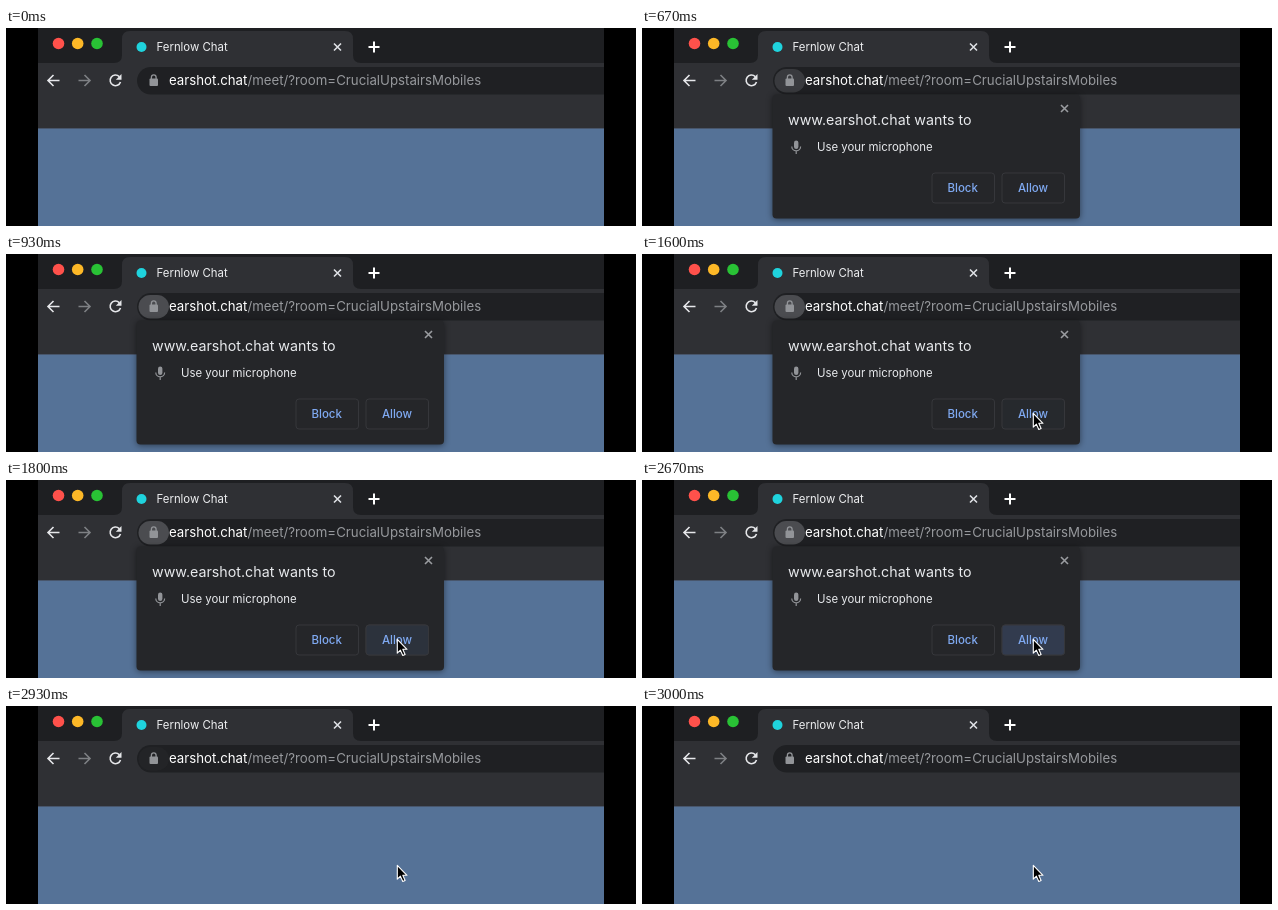
An HTML page that plays this animation: 630 px wide and 198 px high, repeating every 3070 ms.

```html
<!DOCTYPE html>
<html lang="en">
<head>
<meta charset="utf-8">
<title>Microphone permission</title>
<style>
  html, body { margin: 0; width: 100%; height: 100%; overflow: hidden; background: #000; }
  svg { display: block; font: 11.4px Inter, sans-serif; }
  .line { fill: none; stroke-width: 1.6; }
  .button rect { stroke: #36373b; }
  .button text { fill: #7fa9f1; font-size: 11.5px; font-weight: 500; text-anchor: middle; }
  #dialog { filter: drop-shadow(0 1px 3px #0007); }
</style>
</head>
<body>
<svg width="630" height="198" viewBox="0 0 630 198">
  <defs>
    <path id="cross" class="line" d="M-3.5-3.5 3.5 3.5M3.5-3.5-3.5 3.5"/>
    <path id="arrow" class="line" d="M6 0H-5.2M0-5.5-5.5 0 0 5.5"/>
    <clipPath id="window"><path d="M32 0H598V198H32z"/></clipPath>
  </defs>

  <g clip-path="url(#window)">
    <path fill="#1e1f22" d="M32 0H598V36H32z"/>
    <path fill="#2f3034" d="M32 35H108Q116 35 116 27V11Q116 3 124 3H339Q347 3 347 11V27Q347 35 355 35H598V100H32z"/>
    <path fill="#48566c" d="M32 100H598V101H32z"/>
    <path fill="#557297" d="M32 101H598V198H32z"/>

    <circle cx="52.5" cy="15.5" r="5.8" fill="#ff514b"/>
    <circle cx="71.7" cy="15.5" r="5.8" fill="#fdb827"/>
    <circle cx="91" cy="15.5" r="5.8" fill="#29c235"/>

    <circle cx="135.5" cy="19" r="5" fill="#1fd3dd"/>
    <text x="150.5" y="23" fill="#eeeff1">Fernlow Chat</text>
    <use href="#cross" x="331.5" y="19" stroke="#dfe1e5"/>
    <path class="line" stroke="#fff" style="stroke-width:2" d="M368 13.5V24.5M362.5 19H373.5"/>

    <use href="#arrow" x="47.5" y="52.5" stroke="#e6e7ea"/>
    <use href="#arrow" transform="translate(78.5 52.5) scale(-1 1)" stroke="#7e8084"/>
    <path class="line" stroke="#e6e7ea" d="M113.2 48.6A5.3 5.3 0 1 0 114.5 54"/>
    <path fill="#e6e7ea" d="M115.5 46V51.7H109.8z"/>

    <rect x="131" y="39" width="500" height="27.5" rx="13.75" fill="#1f2023"/>
    <rect id="chip" x="132.5" y="41" width="30.5" height="23.5" rx="11.75" fill="#4b4c50"/>
    <rect x="143.5" y="50.5" width="8.5" height="7.5" rx="1" fill="#929498"/>
    <path class="line" stroke="#929498" style="stroke-width:1.3" d="M145.4 51V49.3a2.35 2.35 0 0 1 4.7 0V51"/>
    <text x="163" y="57.2" font-size="13.25" fill="#fff">earshot.chat<tspan fill="#97999d">/meet/?room=CrucialUpstairsMobiles</tspan></text>

    <g id="dialog">
      <rect x="130.5" y="66.5" width="307.5" height="124" rx="4" fill="#252629"/>
      <text x="146" y="96.5" font-size="14.25" fill="#e8eaed">www.earshot.chat wants to</text>
      <use href="#cross" x="422.5" y="80.5" stroke="#9a9ca0"/>
      <rect x="152" y="112.5" width="4.4" height="8.5" rx="2.2" fill="#929498"/>
      <path class="line" stroke="#929498" style="stroke-width:1.2" d="M149.8 118.5a4.4 4.4 0 0 0 8.8 0M154.2 123V126"/>
      <text x="175" y="123.3" fill="#e8eaed">Use your microphone</text>
      <g class="button">
        <rect x="290" y="145" width="62.5" height="30" rx="3" fill="none"/>
        <text x="320.7" y="164">Block</text>
      </g>
      <g class="button">
        <rect x="360" y="145" width="62.5" height="30" rx="3" fill="none"/>
        <rect id="tint" x="360" y="145" width="62.5" height="30" rx="3"/>
        <text x="391" y="164">Allow</text>
      </g>
    </g>

    <path id="cursor" fill="#000" stroke="#fff" stroke-width="1.1" stroke-linejoin="round"
      d="M391.3 159.3V173.2L394.4 170.2 396.8 175.5 399.1 174.5 396.8 169.3H401z"/>
  </g>
</svg>
<script>
  const LOOP = 3070, TICK = 1000 / 15;
  const part = id => document.getElementById(id);
  const [chip, dialog, tint, cursor] = ['chip', 'dialog', 'tint', 'cursor'].map(part);
  const clamp = v => Math.max(0, Math.min(1, v));
  const show = (el, on) => el.style.visibility = on ? 'visible' : 'hidden';

  function draw(now) {
    const t = now % LOOP;
    const tick = Math.floor((t + 4) / TICK); // the screen refreshes 15 times a second
    const opened = tick >= 10, pressed = tick >= 40, closed = tick >= 43;

    show(dialog, opened && !closed);
    show(cursor, tick >= 24);
    chip.style.opacity = closed ? clamp((45 - tick) * 0.1) : opened ? clamp((tick - 7) / 5) : 0;
    tint.style.fill = pressed ? '#323b4e' : '#2c323c';
    tint.style.opacity = clamp((tick - 23) / 4);
    requestAnimationFrame(draw);
  }
  draw(0);
</script>
</body>
</html>
```
